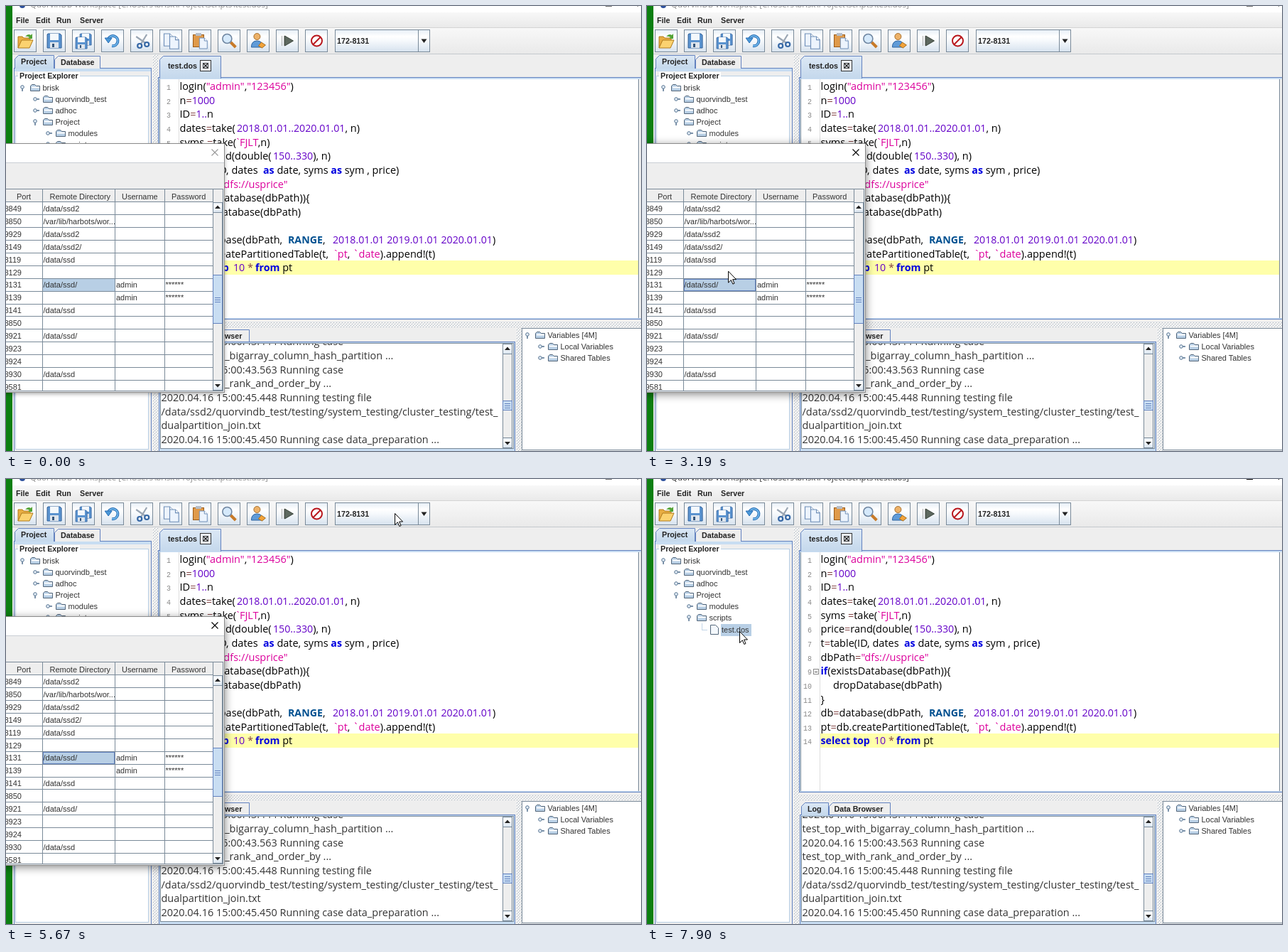
An HTML page that plays this animation: 894 by 626 pixels, repeating every 8000 ms.

```html
<!DOCTYPE html>
<html lang="en">
<head>
<meta charset="utf-8">
<title>Workspace</title>
<style>
html, body { margin: 0; width: 100%; height: 100%; overflow: hidden; background: #eee; }
svg { display: block; width: 894px; height: 626px; }
text { white-space: pre; font: 11px "Liberation Sans", Arial, sans-serif; fill: #333; }
text.b { font-size: 10.7px; font-weight: bold; fill: #222; }
text.code { font: 14.5px "Open Sans", "Noto Sans", sans-serif; fill: #000; }
text.log { font: 14.45px "Open Sans", "Noto Sans", sans-serif; }
text.num { font: 10px "Liberation Mono", monospace; fill: #888; text-anchor: end; }
text.title { font: 11.5px "Open Sans", sans-serif; }
.str { fill: #dc009c; }
.dig { fill: #6400c8; font-size: 14.2px; }
.key { fill: #0000e0; font-weight: bold; font-size: 14.2px; }
.con { fill: #005090; font-weight: bold; font-size: 14.2px; }
.op { fill: #804040; }
.tick { font-family: "Liberation Sans", sans-serif; }
rect, .crisp { shape-rendering: crispEdges; }
</style>
</head>
<body>
<svg id="stage" viewBox="0 0 894 626" xmlns="http://www.w3.org/2000/svg"></svg>
<script>
const EDGE = '#7a8a99', BLUE = '#b8cfe5', FRAME = '#6382bf', PANEL = '#eeeeee';

const rect = (x, y, w, h, fill, stroke) => stroke
  ? `<rect x="${x + .5}" y="${y + .5}" width="${w - 1}" height="${h - 1}" fill="${fill}" stroke="${stroke}"/>`
  : `<rect x="${x}" y="${y}" width="${w}" height="${h}" fill="${fill}"/>`;
const path = (d, fill = 'none', stroke = 'none', width = 1, extra = '') =>
  `<path d="${d}" fill="${fill}" stroke="${stroke}" stroke-width="${width}" ${extra}/>`;
const line = (d, color) => path(d, 'none', color, 1, 'class="crisp"');
const text = (x, y, s, cls = '', extra = '') => `<text x="${x}" y="${y}" class="${cls}" ${extra}>${s}</text>`;
const at = (x, y, s, scale = 1) => `<g transform="translate(${x} ${y}) scale(${scale})">${s}</g>`;
const gradient = (id, ...stops) => `<linearGradient id="${id}" x2="0" y2="1">` +
  stops.map(([o, c]) => `<stop offset="${o}" stop-color="${c}"/>`).join('') + '</linearGradient>';

const defs = '<defs>' +
  gradient('btn', [0, '#e6eef6'], [.3, '#fff'], [.5, '#f6f9fc'], [1, '#d6e2ee']) +
  gradient('tab', [0, '#dce8f5'], [1, '#c4d8ec']) +
  gradient('bar', [0, '#f8f8f8'], [1, '#e9e9e9']) +
  `<pattern id="bumps" width="4" height="4" patternUnits="userSpaceOnUse">
    <rect width="4" height="4" fill="#eee"/><rect width="1" height="1" fill="#fff"/><rect x="1" y="1" width="1" height="1" fill="#a3b0bd"/>
    <rect x="2" y="2" width="1" height="1" fill="#fff"/><rect x="3" y="3" width="1" height="1" fill="#a3b0bd"/></pattern>
  <clipPath id="logClip"><rect x="217" y="475" width="482" height="151"/></clipPath></defs>`;

// Toolbar icons, centred on 0,0
const floppy = path('M-9-10H8L10-8V10H-10V-9Z', '#5b93cf', '#2f5f98') + rect(-6, -10, 12, 9, '#f4f8fc') +
  rect(-6, 2, 12, 8, '#dfe5ec') + rect(-3, 4, 3, 5, '#35567c');
const page = path('M-5-7H2L6-3V8H-5Z', '#edf4fd', '#6f8fb8') + path('M2-7V-3H6', '#fff', '#6f8fb8');
const icons = [
  path('M-10 10V-6H-4L-2-4H7V-1', '#e8ad43', '#b07a1c') + path('M-10 10L-5-1H11L6 10Z', '#fbd270', '#b07a1c') +
    path('M0-6Q4-11 8-8L10-10V-3H4L6-5Q3-7 0-6Z', '#52a336'),
  floppy,
  at(3, -2, floppy, .8) + at(-3, 3, floppy, .8),
  path('M-6-3A7 7 0 1 1-1 7', 'none', '#2a6fb5', 4) + path('M-6-3A7 7 0 1 1-1 7', 'none', '#6db3e8', 2) +
    path('M-11-4H-1L-6 3Z', '#4a98d8', '#2a6fb5'),
  path('M-8-6L5 3M7-9L-1 4', 'none', '#9aa6b4', 2.2) +
    '<g fill="none" stroke="#3567a5" stroke-width="2.2"><circle cx="-3" cy="7" r="3"/><circle cx="7" cy="5" r="3"/></g>',
  at(-4, -2, page, 1.15) + at(4, 2, page, 1.15),
  rect(-10, -9, 16, 18, '#e09a4a', '#9a5a16') + rect(-6, -11, 8, 4, '#b6bdc6') + at(4, 3, page),
  path('M2 2L9 9', 'none', '#c77a28', 4) + '<circle cx="-3" cy="-3" r="6.5" fill="#d5e9fb" stroke="#6f86a1" stroke-width="1.6"/>',
  '<circle cx="-2" cy="-6" r="4.5" fill="#edb269" stroke="#a56d2b"/>' +
    path('M-10 9Q-10 0-2 0T6 9Z', '#5f9bd8', '#2f65a0') + path('M0 7L4 2L10 6L5 10Z', '#f2a33a', '#a86f20'),
  path('M-8-7V7M-5-7V7', 'none', '#aaa') + path('M-4-7L8 0L-4 7Z', '#5d685f', '#3c463d'),
  '<circle r="7.500" fill="#fff" stroke="#b8161c" stroke-width="2"/>' + path('M5-5L-5 5', 'none', '#b8161c', 2)
];

const folder = (x, y) => at(x, y, path('M.5 9.5V2.5L2.5.5H6.5L8.5 2.5H13.5V9.5Z', BLUE, '#53667a') +
  path('M2 4.5H13', 'none', '#fff', 2));
const knob = (x, y, open) => path(open ? `M${x} ${y}V${y + 6}` : `M${x} ${y}H${x + 6}`, 'none', '#53718f', 1.5) +
  `<circle cx="${x}" cy="${y}" r="2.3" fill="#e6eff8" stroke="#53718f"/>`;
const node = (x, y, label, open) => knob(x, y - (open ? 1 : 0), open) + folder(x + 11, y - 5) + text(x + 28.5, y + 4, label);
const tab = (x, y, w, h, label, selected) =>
  path(`M${x + .5} ${y + h}V${y + 5.5}L${x + 5.5} ${y + .5}H${x + w - .5}V${y + h}`, selected ? 'url(#tab)' : PANEL, FRAME) +
  text(x + 9, y + h / 2 + 3.5, label, 'b');
const arrow = (x, y, dir) => path(`M${x - 4} ${y - 2 * dir}H${x + 4}L${x} ${y + 2.5 * dir}Z`, '#222');
const scrollbar = (x, y, h, thumbY, thumbH) => rect(x, y, 14, h, PANEL, EDGE) +
  rect(x, y, 14, 15, 'url(#btn)', EDGE) + rect(x, y + h - 15, 14, 15, 'url(#btn)', EDGE) +
  arrow(x + 7, y + 7, -1) + arrow(x + 7, y + h - 7, 1) +
  rect(x, thumbY, 14, thumbH, '#c8ddf2', FRAME) +
  [-3, 0, 3].map(d => line(`M${x + 3} ${Math.round(thumbY + thumbH / 2) + d + .5}h8`, FRAME)).join('');

// "@n " moves the pen to x = n
const code = [
  'login("admin","123456")', 'n=1000', 'ID=1..n', 'dates=take(@325 2018.01.01..2020.01.01, n)',
  'syms =take(`FJLT,n)', 'price=rand(double(@376 150..330), n)',
  't=table(ID, dates @362 as date, syms as sym , price)', 'dbPath="dfs://usprice"',
  'if(existsDatabase(dbPath)){', '@262 dropDatabase(dbPath)', '}',
  'db=database(dbPath, @397 RANGE,@460 2018.01.01 2019.01.01 2020.01.01)',
  'pt=db.createPartitionedTable(t, @462 `pt, `date).append!(t)',
  'select top @320 10 * @351 from pt'
];
const TOKEN = /("[^"]*"|`\w+)|(\d[\d.]*)|\b(as|if|select|top|from)\b|\b(RANGE)\b|([=*])/g;
const KINDS = ['str', 'dig', 'key', 'con', 'op'];
const paint = s => s
  .replace(TOKEN, (m, ...groups) => `<tspan class="${KINDS[groups.findIndex(g => g)]}">${m}</tspan>`)
  .replace('`', '<tspan class="tick">`</tspan>');
const codeLine = (s, i) => {
  const parts = s.split(/@(\d+) /), y = 118 + i * 19.65;
  let out = text(232, y, i + 1, 'num') + text(244.5, y, paint(parts[0]), 'code');
  for (let k = 1; k < parts.length; k += 2) out += text(parts[k], y, paint(parts[k + 1]), 'code');
  return out;
};

const log = ['2020.04.16 15:00:43.444 Running case', 'test_top_with_bigarray_column_hash_partition ...',
  '2020.04.16 15:00:43.563 Running case', 'test_top_with_rank_and_order_by ...',
  '2020.04.16 15:00:45.448 Running testing file',
  '/data/ssd2/quorvindb_test/testing/system_testing/cluster_testing/test_',
  'dualpartition_join.txt', '2020.04.16 15:00:45.450 Running case data_preparation ...'];

const mainWindow = rect(0, 0, 894, 626, '#0c7f12') + rect(9, 0, 885, 626, PANEL) + rect(9, 0, 885, 9, '#fff') +
  '<circle cx="23" cy="-1" r="4" fill="#2b4f9c"/>' +
  `<g id="caption">${text(34, 1.5, 'QuorvinDB Workspace [C:\\Users\\brisk\\Project\\scripts\\test.dos]', 'title')}
    <rect x="844" y="0" width="9" height="1"/><rect x="889" y="0" width="1" height="1"/></g>` +
  rect(9, 9, 885, 22, 'url(#bar)') + rect(9, 31, 885, 37, 'url(#bar)') + line('M9 30.5H894', '#d4d4d4') + line('M9 67.5H894', '#c4c9ce') +
  [[14, 'File'], [42, 'Edit'], [71, 'Run'], [104, 'Server']].map(([x, s]) => text(x, 24, s, 'b')).join('') +
  icons.map((icon, i) => rect(11 + i * 41.05 | 0, 33, 32, 32, 'url(#btn)', EDGE) + at(27 + i * 41.05, 49, icon)).join('') +
  rect(463, 33, 134, 32, 'url(#btn)', EDGE) + rect(580, 33, 17, 32, 'url(#btn)', EDGE) + text(466, 53, '172-8131', 'b') + arrow(588.5, 49, 1.2) +
  // project pane
  rect(206, 68, 8, 558, 'url(#bumps)') + rect(11, 87, 194, 545, '#fff', FRAME) + rect(12, 88, 192, 4, '#c8ddf2') +
  tab(12, 69, 56, 19, 'Project', true) + tab(68, 70, 65, 18, 'Database') +
  rect(12, 92, 192, 534, PANEL) + rect(13, 98, 188, 526, '#fff', BLUE) + rect(17, 93, 87, 11, '#fff') + text(19, 102, 'Project Explorer', 'b') +
  node(23, 115, 'brisk', true) + node(41, 131, 'quorvindb_test') + node(41, 147, 'adhoc') + node(41, 163, 'Project', true) +
  node(59, 179, 'modules') + node(59, 195, 'scripts', true) + line('M77.5 203V212.5H85', '#c4d6e8') +
  path('M89.5 205.5H96.5L100.5 209.5V218.5H89.5Z', '#f4f8fc', '#53667a') +
  rect(104, 204, 43, 17, BLUE) + text(105, 216, 'test.dos') +
  // editor
  rect(214, 100, 690, 341, '#c8ddf2', FRAME) + tab(216, 70, 87, 32, '', true) + text(228, 88, 'test.dos', 'b') +
  rect(273, 76, 16, 16, '#edf3f9', '#333') + path('M277.5 80.5L284.5 87.5M284.5 80.5L277.5 87.5', 'none', '#222', 1.4) + rect(277, 80, 8, 8, 'none', '#444') +
  rect(217, 103, 674, 336, '#fff') + rect(891, 103, 3, 336, PANEL) + line('M890.5 103V439M216.5 103V439', EDGE) + line('M243.5 103V439', '#ddd') +
  rect(244, 358, 646, 20, '#ffffaa') + code.map(codeLine).join('') +
  rect(234, 267, 8, 8, '#fff', '#888') + line('M236 271.5h4', '#555') +
  rect(214, 445, 680, 7, 'url(#bumps)') +
  // log
  rect(215, 472, 502, 160, '#c8ddf2', FRAME) + tab(217, 455, 39, 18, 'Log', true) + tab(256, 455, 87, 17, '') + text(263.5, 467.5, 'Data Browser', 'b') +
  rect(217, 474, 498, 149, '#fff', EDGE) + `<g clip-path="url(#logClip)">${log.map((s, i) => text(218.5, 477.4 + i * 19.65, s, 'log')).join('')}</g>` +
  scrollbar(699, 475, 147, 555, 14) +
  // variables
  rect(718, 453, 8, 173, 'url(#bumps)') + rect(726, 453, 175, 172, '#fff', EDGE) +
  node(734, 463, 'Variables [4M]', true) + node(752, 479, 'Local Variables') + node(752, 495, 'Shared Tables');

const rowY = i => Math.floor(275.8 + 17.9 * i);
const rows = [['8849', '/data/ssd2'], ['8850', '/var/lib/harbots/wor...'], ['9929', '/data/ssd2'], ['8149', '/data/ssd2/'],
  ['8119', '/data/ssd'], ['8129'], ['8131', '/data/ssd/', 'admin', '******'], ['8139', '', 'admin', '******'],
  ['8141', '/data/ssd'], ['8850'], ['8921', '/data/ssd/'], ['8923'], ['8924'], ['8930', '/data/ssd'], ['9581']];
const columns = [-2.5, 52.5, 155, 224.5];
const grid = rows.map((_, i) => `M0 ${rowY(i) + .5}H291`).join('') + 'M51.5 258V541M153.5 258V541M223.5 258V541M291.5 258V541';

const dialog = '<g id="dialog"><rect id="shadow" x="-40" y="197" width="347" height="348"/>' +
  rect(-20, 193, 328, 351, PANEL, '#8b8b8b') + rect(0, 194, 307, 27, '#fff') + line('M0 220.5H307', '#c9ced4') +
  '<rect id="closeBox" x="280" y="194" width="27" height="26"/>' +
  path('M289.5 201.5L298.5 210.5M298.5 201.5L289.5 210.5', 'none', '#000', 1.1, 'id="closeX"') +
  rect(0, 276, 291, 265, '#fff') + line('M0 257.5H306', EDGE) +
  '<rect id="cell" x="52.5" width="100" height="16"/>' + line(grid, EDGE) + line('M0 541.5H306M305.5 258V541', EDGE) +
  [[15, 'Port'], [61.5, 'Remote Directory'], [163, 'Username'], [233, 'Password']].map(([x, s]) => text(x, 272, s)).join('') +
  rows.map((row, i) => row.map((s, c) => text(columns[c], Math.round(289 + 17.9 * i), s)).join('')).join('') +
  scrollbar(291, 276, 265, 378, 69) + '</g>';

const pointer = '<circle id="halo" r="10" fill="#f5d000" opacity=".65"/>' +
  path('M.5.5V16.5L4.3 12.8L6.8 18.5L9 17.5L6.6 12H11.5Z', '#fff', '#000', 1, 'id="pointer"');

document.getElementById('stage').innerHTML = defs + mainWindow + dialog + pointer;
const el = Object.fromEntries(['caption', 'dialog', 'shadow', 'closeBox', 'closeX', 'cell', 'halo', 'pointer']
  .map(id => [id, document.getElementById(id)]));
const set = (node, attrs) => { for (const k in attrs) node.setAttribute(k, attrs[k]); };

// Pointer route: time, x, y
const route = [
  [0, 760, 640], [70, 722, 610], [250, 380, 480], [400, 57, 396], [530, 92, 392], [700, 93, 392], [850, 105, 392],
  [1500, 105, 392], [1720, 98, 432], [1950, 95, 418], [2100, 95, 408], [2400, 95, 408], [2560, 96, 391],
  [3150, 96, 391], [3420, 215, 270], [3650, 298, 150], [3800, 293, 203], [4270, 293, 203], [4350, 290, 202],
  [4600, 360, 120], [4820, 480, 18], [4950, 534, 32], [5120, 508, 46], [5270, 491, 46], [5380, 491, 46],
  [5670, 547, 48], [5750, 554, 49], [5950, 360, 200], [6050, 192, 307], [6200, 294, 216], [6280, 299, 211],
  [6700, 299, 211], [7000, 235, 236], [7280, 183, 242], [7510, 130, 217], [7750, 130, 217], [7820, 130, 214], [8000, 130, 214]
];
const clicks = [[850, 1260], [2100, 2330], [2720, 2870], [6440, 6590]];
const between = (v, a, b) => v >= a && v < b;

function pointerAt(t) {
  const i = route.findIndex(p => p[0] > t), [t0, x0, y0] = route[i - 1], [t1, x1, y1] = route[i];
  const k = (t - t0) / (t1 - t0);
  return [x0 + (x1 - x0) * k, y0 + (y1 - y0) * k];
}

function draw(t) {
  const [x, y] = pointerAt(t), focused = t >= 1020, lower = between(t, 2180, 2640);
  const pressed = clicks.some(([a, b]) => between(t, a, b));
  const hover = between(x, 280, 307) && between(y, 194, 220);
  const closing = Math.min(1, Math.max(0, (t - 6590) / 180));

  set(el.pointer, { transform: `translate(${x} ${y})`, visibility: t < 70 ? 'hidden' : 'visible' });
  set(el.halo, { cx: x + (hover ? -2 : .5), cy: y + 1, visibility: pressed ? 'visible' : 'hidden' });
  set(el.cell, { y: rowY(lower ? 7 : 6) + 1.5, fill: BLUE, stroke: focused ? FRAME : BLUE });
  set(el.closeBox, { fill: hover ? (pressed ? '#f1707a' : '#e81123') : '#fff' });
  set(el.closeX, { stroke: hover ? '#fff' : focused ? '#000' : '#999' });
  set(el.shadow, { style: focused ? 'filter:blur(7px);opacity:.55' : 'filter:blur(3px);opacity:.4' });
  const s = 1 - .08 * closing;
  set(el.dialog, { opacity: 1 - closing, visibility: closing < 1 ? 'visible' : 'hidden',
    transform: `translate(0 ${369 * (1 - s)}) scale(${s})` });
  set(el.caption, { opacity: t < 6590 ? .55 : 1 });
}

function tick(now) {
  draw(now % 8000);
  requestAnimationFrame(tick);
}
draw(0);
requestAnimationFrame(tick);
</script>
</body>
</html>
```
